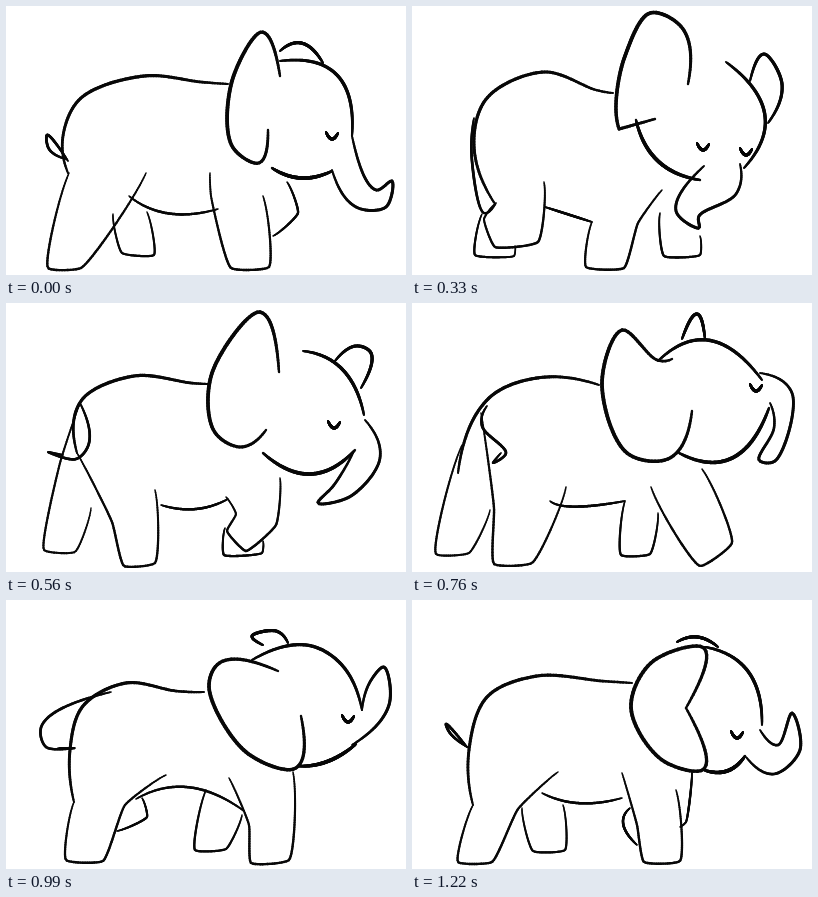
Write an HTML page with a canvas that moves like this. It is 400 by 269 pixels and loops after 1.32 s.

```html
<!DOCTYPE html>
<html lang="en">
<head>
<meta charset="utf-8">
<title>Walking elephant</title>
<style>
html, body { margin: 0; width: 100%; height: 100%; overflow: hidden; background: #fff; }
canvas { display: block; }
</style>
</head>
<body>
<canvas width="400" height="269"></canvas>
<script>
const ctx = document.querySelector('canvas').getContext('2d');
const STEPS = 16, SAMPLES = 90;
const HOLDS = [100, 30, 100, 100];       // repeated four times per loop
const KEYS = [0, 2, 4, 7, 9, 12, 15];    // steps at which the poses below stand

const parts = [];
// One brush stroke: width, roundness, one string of points per key pose ('' = hidden).
// A doubled point makes a corner.
function part(width, round, ...poses) {
  parts.push({ width, poses: poses.map(p => p && sample(p, round)) });
}

// A small smile below each given place
function eye(...places) {
  part(3, 1, ...places.map(p => {
    const [x, y] = p.split(' ').map(Number);
    return p && [x - 6, y - 7, x, y, x + 6, y - 6].join(' ');
  }));
}

const mix = (p, q, u) => [p[0] + (q[0] - p[0]) * u, p[1] + (q[1] - p[1]) * u];
const dist = (p, q) => Math.hypot(q[0] - p[0], q[1] - p[1]);

// Centripetal spline through the points, with parabolic ends
function spline(pts, round) {
  const last = pts.length - 1, line = [];
  const gap = i => Math.sqrt(dist(pts[i], pts[i + 1]));
  const slope = (i, k) => (pts[i + 1][k] - pts[i][k]) / gap(i);
  function speed(i, k) {
    if (last === 1) return slope(0, k);
    if (i === 0) return 2 * slope(0, k) - speed(1, k);
    if (i === last) return 2 * slope(last - 1, k) - speed(last - 1, k);
    const a = gap(i - 1), b = gap(i);
    return (slope(i - 1, k) * b + slope(i, k) * a) / (a + b);
  }
  for (let i = 0; i < last; i++) {
    for (let s = 0; s <= 20; s++) {
      const u = s / 20, v = 1 - u, g = gap(i) * round;
      line.push([0, 1].map(k =>
        pts[i][k] * v * v * (1 + 2 * u) + pts[i + 1][k] * u * u * (3 - 2 * u) +
        g * (speed(i, k) * u * v * v - speed(i + 1, k) * u * u * v)));
    }
  }
  return line;
}

function sample(text, round) {
  const n = text.split(' ').map(Number), runs = [[]];
  for (let i = 0; i < n.length; i += 2) {
    const p = [n[i], n[i + 1]], run = runs[runs.length - 1], prev = run[run.length - 1];
    if (prev && dist(prev, p) === 0) runs.push([p]);
    else run.push(p);
  }
  const line = runs.flatMap(r => spline(r, round));
  // even spacing along the curve
  const len = [0];
  for (let i = 1; i < line.length; i++) len.push(len[i - 1] + dist(line[i - 1], line[i]));
  const out = [];
  for (let i = 0, j = 0; i <= SAMPLES; i++) {
    const goal = len[len.length - 1] * i / SAMPLES;
    while (j < len.length - 2 && len[j + 1] < goal) j++;
    out.push(mix(line[j], line[j + 1], Math.min(1, (goal - len[j]) / (len[j + 1] - len[j] || 1))));
  }
  return out;
}

// back and rump
part(3.1, 1,
  '222 78 195 76 138 70 75 92 57 130 62 167',
  '183 73 120 72 65 107 53 150 63 202',
  '201 87 184 84 132 66 75 92 62 140 83 198',
  '203 81 185 80 128 73 75 98 71 150',
  '187 82 125 75 75 97 46 170',
  '198 92 170 91 120 83 77 106 64 150 68 202',
  '220 83 190 81 125 76 75 97 57 150 61 205');
// belly
part(2.4, 1,
  '123 190 160 207 212 203',
  '118 186 148 205 187 205',
  '133 201 180 216',
  '155 202 190 206 222 196',
  '138 198 152 203 213 198',
  '130 199 180 187 238 211',
  '130 193 165 203 210 198');
// tail
part(2.6, 1,
  '62 155 41 129 43 143 60 153',
  '56 121 41 152 52 163',
  '62 112 60 155 72 207 84 197',
  '74 100 83 140 70 156 42 149 57 152',
  '75 103 70 123 94 150 81 160 89 150',
  '105 92 36 125 40 147 69 148 52 148',
  '57 148 38 133 34 124 55 147');
// near hind leg
part(2.3, .45,
  '63 167 42 262 75 262 140 167',
  '63 202 42 221 62 248 102 224 118 184',
  '83 198 72 213 83 241 126 236 132 176',
  '71 150 106 219 118 263 149 260 149 187',
  '69 110 82 205 82 261 120 260 154 184',
  '68 202 60 260 97 261 119 205 160 175',
  '61 205 46 262 80 262 106 209 146 172');
// far hind leg
part(2.1, .45,
  '107 208 116 247 148 249 141 206',
  '84 249 123 247 124 190',
  '70 208 63 249 102 250 103 240',
  '73 103 54 160 38 247 69 249 85 205',
  '50 142 24 251 57 250 78 207',
  '111 231 141 217 136 198',
  '110 208 121 251 153 250 151 205');
// near front leg
part(2.3, .45,
  '204 167 205 190 225 262 263 261 257 190',
  '191 178 192 262 228 261 238 204 267 194',
  '180 216 174 261 212 262 226 217 250 184',
  '220 194 230 211 221 228 240 248 270 222 274 175',
  '239 184 288 263 320 240 290 166',
  '223 178 243 225 245 263 283 260 287 172',
  '210 173 225 225 232 262 268 261 264 190');
// far front leg
part(2.2, .45,
  '281 176 292 207 267 230',
  '260 200 284 225 283 250 315 249 317 217',
  '248 207 252 250 288 249 288 230',
  '219 225 218 252 256 250 257 238',
  '213 198 209 252 238 251 246 210',
  '200 190 189 250 220 249 236 215',
  '280 172 274 222 268 227');
// raised far foot behind the near leg
part(2.4, 1, '', '', '', '', '', '', '218 208 211 222 225 245');
// near ear
part(3.6, 1,
  '274 70 256 26 226 75 226 140 253 157 262 124',
  '271 80 252 33 219 18 188 75 207 153 248 118',
  '276 78 271 23 238 7 213 50 204 98 207 123 207 123 243 113',
  '273 69 254 9 206 70 208 128 235 144 260 127',
  '260 56 245 57 210 27 190 80 215 150 258 155 280 108',
  '272 71 215 62 203 87 240 152 290 168 295 116',
  '274 108 292 48 240 62 219 108 250 160 292 169 274 108');
// far ear
part(3.1, 1,
  '274 45 295 37 317 57',
  '317 57 328 30 355 60 351 93',
  '338 75 352 48 370 78 356 117',
  '329 58 350 43 365 50 355 85',
  '270 36 285 11 293 36',
  '257 45 246 36 270 31 282 43',
  '265 42 285 37 306 47');
// forehead
part(3.2, 1,
  '274 55 330 68 346 130',
  '290 58 345 86 333 160',
  '314 56 353 110 332 162',
  '297 48 335 65 358 112',
  '246 58 295 37 350 77',
  '246 60 300 45 335 64 356 110',
  '293 47 335 70 350 125');
// trunk: forehead, tip, mouth
part(2.9, 1,
  '346 130 370 184 386 175 380 201 350 201 326 164',
  '329 155 340 190 370 192 370 192 330 211 298 165',
  '328 158 324 188 287 210 287 222 264 205 292 160',
  '359 117 374 155 345 193 312 200 328 182 348 148',
  '348 70 380 90 363 158 347 157 362 125 358 100',
  '356 110 364 82 378 67 383 105 346 145',
  '348 130 366 145 380 113 388 150 362 174 334 157');
// jaw
part(3.6, 1,
  '266 162 295 172 326 165',
  '234 126 260 163 296 173',
  '224 114 246 155 288 174',
  '257 150 305 171 349 147',
  '267 150 318 156 357 105',
  '292 166 320 162 350 144',
  '292 170 315 171 333 156');
eye('326 133', '296 148', '291 144', '328 125', '344 88', '342 122', '325 138');
eye('', '337 141', '334 149', '', '', '', '');

function brush(line, width) {
  for (let i = 1; i < line.length; i++) {
    ctx.lineWidth = width * (.6 + .45 * Math.sqrt(Math.sin(Math.PI * (i - .5) / SAMPLES)));
    ctx.beginPath();
    ctx.moveTo(...line[i - 1]);
    ctx.lineTo(...line[i]);
    ctx.stroke();
  }
}

function draw(step) {
  let k = KEYS.length - 1;
  while (KEYS[k] > step) k--;
  const next = (k + 1) % KEYS.length;
  const u = (step - KEYS[k]) / ((KEYS[next] || STEPS) - KEYS[k]);
  ctx.fillStyle = '#fff';
  ctx.fillRect(0, 0, 400, 269);
  ctx.strokeStyle = '#080808';
  ctx.lineCap = 'round';
  for (const { width, poses } of parts) {
    const a = poses[k], b = poses[next];
    if (a && b) brush(a.map((p, i) => mix(p, b[i], u)), width);
    else if (u < .5 ? a : b) brush(a || b, width);
  }
}

function stepAt(ms) {
  let t = ms % 1320, step = 0;
  while (t >= HOLDS[step % 4]) t -= HOLDS[step++ % 4];
  return step;
}

let start, shown = -1;
function tick(now) {
  start ??= now;
  const step = stepAt(Math.max(0, now - start));
  if (step !== shown) draw(shown = step);
  requestAnimationFrame(tick);
}
draw(0);
requestAnimationFrame(tick);
</script>
</body>
</html>
```
